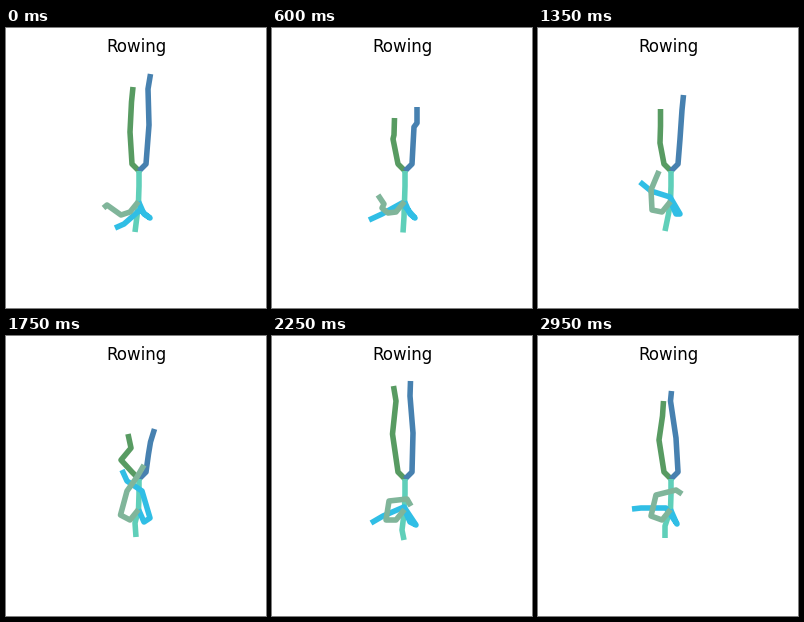
Write a matplotlib script that moves like this. It is 260x280 px and loops after 3 s.

```python
import numpy as np
import matplotlib.pyplot as plt
from matplotlib.animation import FuncAnimation

W, H, DPI = 260, 280, 100
FRAMES, STEP = 60, 50

PELVIS, MID, NECK = (133, 143), (133, 158), (132.5, 173.5)

# Joints per pose, from the body outwards, in stage pixels.
GREEN_LEG = {
    "start": [(124, 104), (125.5, 74), (127, 59)],
    "catch": [(115, 124), (125, 112), (122, 98)],
    "drive": [(121, 111), (122, 107), (122.5, 90)],
    "finish": [(124, 102), (125, 75), (127, 59)],
    "recover": [(122, 115), (122.5, 98), (122.5, 81)],
    "long": [(120.5, 98), (124, 65), (121.5, 50)],
    "end": [(121, 104), (124.5, 80), (125.5, 65)],
}
BLUE_LEG = {
    "start": [(143, 97), (142, 61), (144.5, 46)],
    "catch": [(142.5, 118), (144.5, 106), (148.5, 93)],
    "drive": [(142, 99), (145, 95), (145, 79)],
    "finish": [(143, 98), (142, 62), (144, 47)],
    "recover": [(142, 111), (144, 82), (145.5, 67)],
    "long": [(141, 97), (138, 60), (138.5, 45)],
    "end": [(138, 102), (132.5, 65), (133.5, 55)],
}
HEAD = {
    "start": [(131, 188), (129, 204)],
    "catch": [(129, 187), (130, 201)],
    "drive": [(132, 189), (131, 204.5)],
    "finish": [(132, 189), (131, 204.5)],
    "recover": [(130.5, 186), (127, 203)],
    "long": [(130, 194), (132, 204)],
    "end": [(127, 190), (127, 202)],
}
CYAN_ARM = {
    "start": [(144, 190), (134, 182), (118, 196), (109, 200)],
    "catch": [(144, 182), (136, 155), (121, 145), (116, 134)],
    "drive": [(143, 190), (130, 175), (110, 186), (97, 192)],
    "pull": [(144, 190), (133, 179), (117, 192), (104, 206)],
    "finish": [(144, 189), (134, 178), (118, 189), (101, 203)],
    "recover": [(142, 186), (132, 169), (113, 163), (102, 154)],
    "long": [(144, 189), (132, 171), (111, 180), (99, 187)],
    "end": [(139, 188), (128, 172), (103, 172), (94, 173)],
}
SAGE_ARM = {
    "start": [(115, 187), (108, 182), (101, 177), (97.5, 180)],
    "catch": [(114.5, 179), (121, 155), (131, 141), (138, 129)],
    "drive": [(116, 185), (110, 180), (112, 176), (106, 167)],
    "pull": [(116, 188), (109, 185), (103, 185), (99, 197)],
    "finish": [(116, 188), (109, 185), (102, 183), (97, 198)],
    "recover": [(114, 182), (113, 162), (118, 150), (121, 143)],
    "long": [(114, 184), (117, 165), (135, 163), (139, 170)],
    "end": [(113, 180), (118, 159), (138, 154), (144, 158)],
}

LEG_TIMES = [(0, "start"), (350, "catch"), (420, "catch"), (600, "drive"),
             (1000, "finish"), (1100, "finish"), (1350, "recover"),
             (1630, "catch"), (1750, "catch"), (2250, "long"),
             (2600, "long"), (2950, "end")]
HEAD_TIMES = [(0, "start"), (350, "catch"), (600, "drive"), (1000, "finish"),
              (1350, "recover"), (1750, "catch"), (2250, "long"), (2950, "end")]
ARM_TIMES = [(0, "start"), (350, "catch"), (600, "drive"), (870, "pull"),
             (1000, "finish"), (1350, "recover"), (1750, "catch"),
             (2250, "long"), (2950, "end")]


def smooth_path(schedule, poses):
    """Monotone cubic interpolation of joint positions over time."""
    t = np.array([s[0] for s in schedule], float)
    p = np.array([poses[s[1]] for s in schedule], float)
    h = np.diff(t)
    d = np.diff(p, axis=0) / h[:, None, None]
    m = np.zeros_like(p)
    m[0], m[-1] = d[0], d[-1]
    prod = d[:-1] * d[1:]
    total = np.where(prod > 0, d[:-1] + d[1:], 1)
    m[1:-1] = np.where(prod > 0, 2 * prod / total, 0)

    def at(ms):
        i = int(np.clip(np.searchsorted(t, ms, "right") - 1, 0, len(h) - 1))
        u, k = (ms - t[i]) / h[i], h[i]
        return ((1 + 2 * u) * (1 - u) ** 2 * p[i] + u * (1 - u) ** 2 * k * m[i]
                + u * u * (3 - 2 * u) * p[i + 1] + u * u * (u - 1) * k * m[i + 1])

    return at


fig = plt.figure(figsize=(W / DPI, H / DPI), dpi=DPI, facecolor="white")
ax = fig.add_axes([0, 0, 1, 1])
ax.set_xlim(0, W)
ax.set_ylim(H, 0)
ax.axis("off")
ax.text(130.5, 24, "Rowing", fontsize=12, family="DejaVu Sans",
        ha="center", va="baseline", color="black")

# Fixed root joints, schedule, poses and colour, from back to front.
LIMBS = [
    ([PELVIS, (126, 136)], LEG_TIMES, GREEN_LEG, "#589b62"),
    ([PELVIS, (140, 136)], LEG_TIMES, BLUE_LEG, "#4781b0"),
    ([PELVIS, MID, NECK], HEAD_TIMES, HEAD, "#5fcfb9"),
    ([NECK, (138, 186)], ARM_TIMES, CYAN_ARM, "#30bee5"),
    ([NECK, (124, 184)], ARM_TIMES, SAGE_ARM, "#80b59a"),
]

limbs = []
for root, schedule, poses, color in LIMBS:
    line, = ax.plot([], [], color=color, lw=4, solid_capstyle="butt",
                    solid_joinstyle="round")
    limbs.append((line, np.array(root, float), smooth_path(schedule, poses)))


def draw(i):
    for line, root, path in limbs:
        pts = np.vstack([root, path(i * STEP)])
        line.set_data(pts[:, 0], pts[:, 1])
    return [limb[0] for limb in limbs]


anim = FuncAnimation(fig, draw, frames=FRAMES, interval=STEP,
                     repeat=True, repeat_delay=0, blit=False)
plt.show()
```
